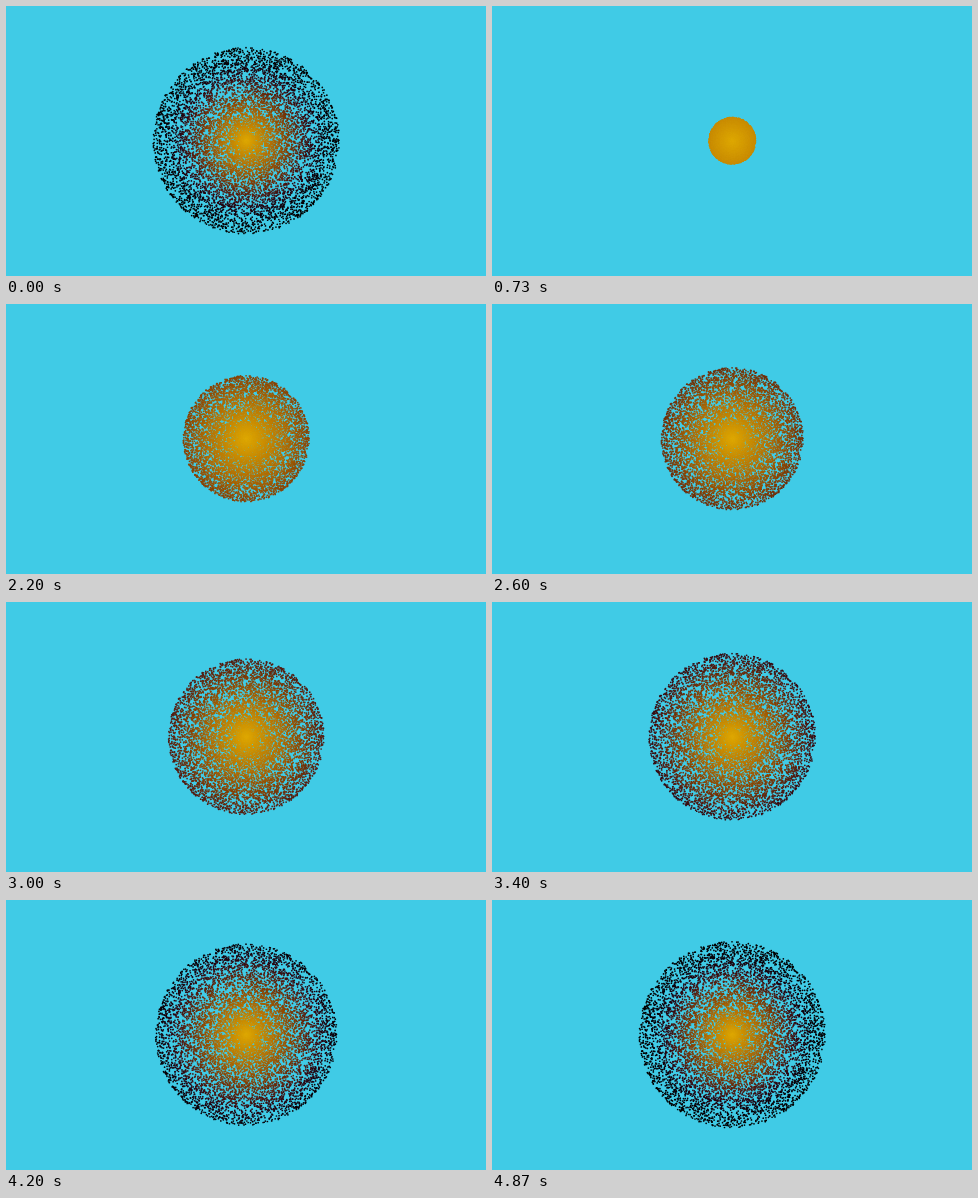
Recreate the animation shown at these times as an HTML page with a canvas. Size 480 by 270 pixels, loop 4940 ms.

```html
<!DOCTYPE html>
<html lang="en">
<head>
<meta charset="utf-8">
<title>Particle burst</title>
<style>
  html, body { margin: 0; width: 100%; height: 100%; overflow: hidden; background: #40cbe6; }
  canvas { display: block; width: 480px; height: 270px; }
</style>
</head>
<body>
<canvas id="stage" width="480" height="270"></canvas>
<script>
const ctx = document.getElementById('stage').getContext('2d');
const LOOP = 4940, BURST_AT = 70;
const CENTER_X = 240.3, CENTER_Y = 134.7, REACH = 93.2;
const COUNT = 9500, DOT = 0.85;

// Colour by distance share times elapsed share: gold, brown, maroon, black.
const STOPS = [
  [0, 222, 168, 2], [0.27, 178, 110, 4], [0.43, 136, 66, 4],
  [0.59, 82, 27, 17], [0.7, 40, 5, 18], [0.82, 8, 0, 8], [1, 0, 0, 0]
];

function colorAt(x) {
  const i = Math.max(1, STOPS.findIndex(stop => stop[0] >= x));
  const a = STOPS[i - 1], b = STOPS[i];
  const k = (x - a[0]) / (b[0] - a[0]);
  return `rgb(${[1, 2, 3].map(c => Math.round(a[c] + (b[c] - a[c]) * k)).join()})`;
}

const PALETTE = Array.from({ length: 129 }, (_, i) => colorAt(i / 128));

let seed = 20177;
function random() {
  seed = (seed + 0x6d2b79f5) | 0;
  let h = Math.imul(seed ^ (seed >>> 15), seed | 1);
  h ^= h + Math.imul(h ^ (h >>> 7), h | 61);
  return ((h ^ (h >>> 14)) >>> 0) / 4294967296;
}

const particles = Array.from({ length: COUNT }, () => {
  const angle = random() * Math.PI * 2;
  const share = random() ** 0.85;
  return { share, x: Math.cos(angle) * share, y: Math.sin(angle) * share };
});

function draw(now) {
  const progress = ((now - BURST_AT + LOOP) % LOOP) / LOOP;
  const radius = REACH * (1 - (1 - progress) ** 2);

  ctx.fillStyle = '#40cbe6';
  ctx.fillRect(0, 0, 480, 270);
  for (const { share, x, y } of particles) {
    ctx.fillStyle = PALETTE[Math.round(share * progress * 128)];
    ctx.beginPath();
    ctx.arc(CENTER_X + x * radius, CENTER_Y + y * radius, DOT, 0, Math.PI * 2);
    ctx.fill();
  }
  requestAnimationFrame(draw);
}

draw(0);
</script>
</body>
</html>
```
